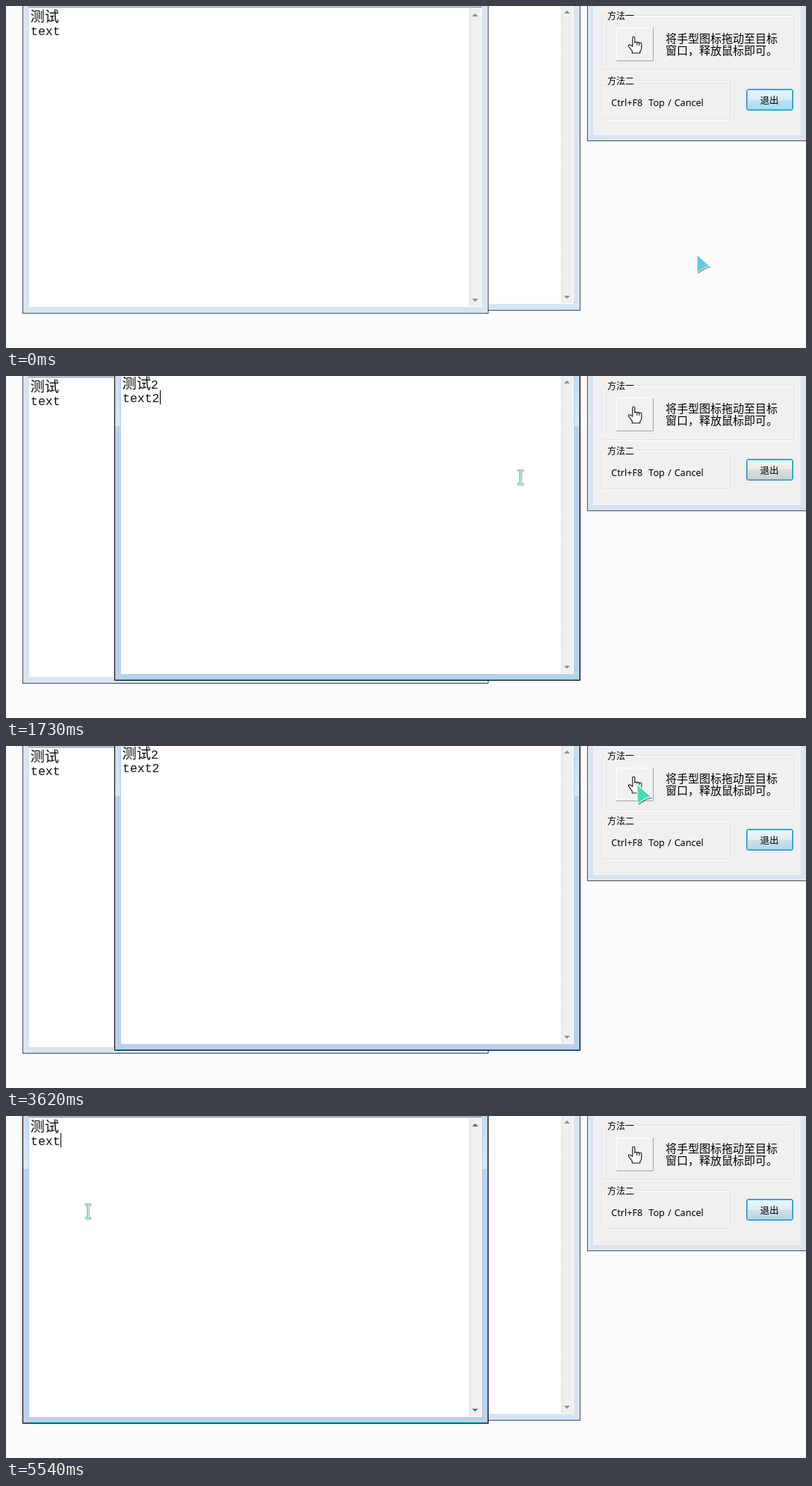
An HTML page for the animation above (5620 ms loop, 1071 by 458 pixels).

```html
<!DOCTYPE html>
<html lang="zh">
<head>
<meta charset="utf-8">
<title>窗口置顶</title>
<style>
html, body { margin: 0; width: 100%; height: 100%; overflow: hidden; background: #fbfbfb; }
svg { display: block; width: 1071px; height: 458px; }
text { font-family: "Noto Sans CJK SC", "Noto Sans CJK", sans-serif; fill: #000; white-space: pre; }
.note { font-family: "Liberation Mono", "Noto Sans CJK SC", "Noto Sans CJK", monospace; font-size: 16.5px; font-weight: 300; fill: #111; }
.note .han { font-size: 19.3px; }
.latin { font-family: "Noto Sans", sans-serif; font-size: 12.6px; word-spacing: .8px; }
.edge { fill: #d7e4f2; stroke: #4a5058; }
.lit { display: none; }
.tri { fill: #8b8b8b; }
.on .edge { fill: #b9d1ea; stroke: #000; }
.on .lit { display: inline; }
.front.on .tri { fill: #4d6f8f; }
.box { fill: none; stroke: #dcdfe0; }
.boxlight { fill: none; stroke: #fff; }
</style>
</head>
<body>
<svg viewBox="0 0 1071 458">
  <defs>
    <linearGradient id="glint" x2="0" y2="1">
      <stop offset="0" stop-color="#c0d7ee"/><stop offset="1" stop-color="#d8e7f7"/>
    </linearGradient>
    <linearGradient id="track">
      <stop offset="0" stop-color="#e6e6e6"/><stop offset=".25" stop-color="#f0f0f0"/>
    </linearGradient>
    <linearGradient id="grey" x2="0" y2="1">
      <stop offset="0" stop-color="#f3f3f3"/><stop offset=".5" stop-color="#ebebeb"/>
      <stop offset=".5" stop-color="#ddd"/><stop offset="1" stop-color="#cfcfcf"/>
    </linearGradient>
    <linearGradient id="blue" x2="0" y2="1">
      <stop offset="0" stop-color="#eaf6fd"/><stop offset=".5" stop-color="#d5eefb"/>
      <stop offset=".5" stop-color="#bee6fa"/><stop offset="1" stop-color="#a9daf3"/>
    </linearGradient>
    <path id="hand" d="M-2 13V1.5Q-2 0-.5 0T1 1.5V8q1.5-1.5 3 0q2-1 3 .6q2.5-1 3 1V15q0 3-2 5v2H-2.5v-2.5l-5-7q0-2.5 2-1.5z"/>
    <path id="arrow" d="M0 0L17 15.5L10 17.5L0 24Z"/>
    <path id="beam" d="M-4-9h3l1 1 1-1h3M0-8V8M-4 9h3l1-1 1 1h3"/>
  </defs>
  <g id="desk"></g>
  <g id="dialog"></g>
  <g id="pointer">
    <g id="p-arrow"><use href="#arrow" x="1.5" y="1.5" opacity=".45"/>
      <use href="#arrow" stroke="#fff" id="tint"/></g>
    <g id="p-hand" transform="scale(1.1 1)"><use href="#hand" x="2" y="1.5" opacity=".4"/>
      <use href="#hand" x="1" fill="#35dfb2" stroke="#fff" stroke-width="1.2"/></g>
    <g id="p-beam" fill="none"><use href="#beam" x="1" y="1" stroke="#666" stroke-width="3.6" opacity=".6"/>
      <use href="#beam" stroke="#fff" stroke-width="3.4"/>
      <use href="#beam" stroke="#5fd3b4" stroke-width="1.6"/></g>
    <circle id="press" r="12" fill="#fff32e" opacity=".62"/>
  </g>
</svg>
<script>
const $ = id => document.getElementById(id);
const LOOP = 5620, TICK = 79.3, FIRST = 48;

const rect = (x, y, w, h, extra) => `<rect x="${x}" y="${y}" width="${w}" height="${h}" ${extra}/>`;

function frame(left, right, bottom, shine) {
  return rect(left + .5, -20.5, right - left, bottom + 21, 'class="edge"') +
    `<g class="lit">` +
    rect(left + 1, -20, 7, shine + 20, 'fill="url(#glint)"') +
    rect(right - 7, -20, 6, shine + 20, 'fill="url(#glint)"') +
    `<path d="M${left + 1} ${bottom - .5}H${right - .5}V-20" fill="none" stroke="#36c9f0"/></g>`;
}

function notepad(id, dx, dy, suffix) {
  const caret = 73.5 + 10 * suffix.length;
  return `<g id="${id}" transform="translate(${dx} ${dy})">` +
    frame(22, 645, 411, 71) +
    rect(31, 1, 606, 402, 'fill="#fff"') +
    rect(30, 1, 607, 1, 'fill="#7d858f"') +
    rect(620, 2, 16, 400, 'fill="url(#track)"') +
    `<path class="tri" d="M624 14l4-4 4 4zM624 392l4 4 4-4z"/>
    <text class="note" x="32.5" y="20.5"><tspan class="han">测试</tspan>${suffix}</text>
    <text class="note" x="33" y="39">text${suffix}</text>
    <path class="caret" d="M${caret} 23V42" stroke="#000"/></g>`;
}

function groupBox(x, y, w, h, title) {
  return rect(x + 1.5, y + 1.5, w, h, 'rx="3" class="boxlight"') +
    rect(x + .5, y + .5, w, h, 'rx="3" class="box"') +
    rect(804, y - 4, 38, 10, 'fill="#f0f0f0"') +
    `<text x="805" y="${y + 5.5}" font-size="12">${title}</text>`;
}

$('desk').innerHTML = notepad('second', 123, -4, '2') + notepad('first', 0, 0, '');

$('dialog').innerHTML =
  frame(778, 1071, 180, 87) +
  rect(786, -5, 278, 178, 'fill="#f0f0f0"') +
  groupBox(798, 12, 257, 73, '方法一') +
  groupBox(797, 99, 173, 52, '方法二') +
  rect(817, 29, 50, 45, 'fill="#f1f1f1"') +
  `<path d="M817.5 73V29.5H866" fill="none" stroke="#fff"/>
  <path d="M817 73.5H866.5V29" fill="none" stroke="#a3a3a3"/>
  <use href="#hand" x="840.8" y="41" fill="#fff" stroke="#111" stroke-width="1.1"/>
  <path d="M844.8 49v4M847.8 50v3" stroke="#111"/>
  <text x="883" y="48.5" font-size="15">将手型图标拖动至目标</text>
  <text x="883" y="64.5" font-size="15">窗口，释放鼠标即可。</text>
  <text class="latin" x="810.3" y="134">Ctrl+F8  Top / Cancel</text>` +
  rect(991.5, 111.5, 62, 28, 'rx="2.5" fill="url(#grey)" stroke="#2a86ab"') +
  rect(993, 113, 59, 25, 'fill="url(#blue)" id="glow"') +
  rect(992.5, 112.5, 60, 26, 'rx="1.5" fill="none" stroke="#46d0f4"') +
  `<text x="1022" y="130.5" font-size="12.5" text-anchor="middle">退出</text>`;

// Times count screen refreshes: the scene opens at `at`, the pointer travels from `go` to `end`
const HOME = [925, 333], ICON = [845, 51];
const scenes = [
  { at: 0, go: 0, end: 8, to: ICON },
  { at: 10, go: 11, end: 19, to: [688, 135], focus: 'dialog', held: true },
  { at: 22, go: 23, end: 30, to: [101, 115], focus: 'second' },
  { at: 30, go: 33, end: 37, to: [290, 126], focus: 'first', click: true },
  { at: 37, go: 40, end: 45, to: ICON, focus: 'second', click: true },
  { at: 47, go: 48, end: 53, to: [491, 146], focus: 'dialog', held: true },
  { at: 55, go: 55, end: 63, to: [109, 127], focus: 'second' },
  { at: 63, go: 63, end: 64, to: [109, 127], focus: 'first', click: true }
];
const RAISED = scenes[2].at, LOWERED = scenes[7].at;

function ease(u) {
  u = Math.min(1, Math.max(0, u));
  return u * u * (3 - 2 * u);
}

// Default button: lit at rest, dark while dragging, then breathing
function glow(n) {
  if (n < RAISED) return n < scenes[1].at ? 1 : 0;
  return .75 * Math.sin((n - RAISED) / 37 * Math.PI) ** 2;
}

const show = (el, on) => el.setAttribute('visibility', on ? 'visible' : 'hidden');

function draw(now) {
  const n = Math.max(0, Math.floor((now % LOOP - FIRST) / TICK) + 1);
  const i = scenes.filter(s => s.at <= n).length - 1;
  const { at, go, end, to, focus, held, click } = scenes[i];
  const from = i ? scenes[i - 1].to : HOME;
  const u = ease((n - go) / (end - go));
  const [x, y] = from.map((v, k) => v + (to[k] - v) * u);
  const shape = held ? 'hand' : x > 778 ? 'arrow' : 'beam';
  const front = $(n >= RAISED && n < LOWERED ? 'second' : 'first');

  if ($('desk').lastElementChild !== front) $('desk').append(front);
  for (const id of ['first', 'second', 'dialog']) {
    const win = $(id), on = id === focus;
    win.classList.toggle('on', on);
    win.classList.toggle('front', id === 'first' && win === front);
    const caret = win.querySelector('.caret');
    if (caret) show(caret, on && (n - at) % 16 < 8);
  }

  $('glow').setAttribute('opacity', glow(n));
  $('pointer').setAttribute('transform', `translate(${x.toFixed(1)} ${y.toFixed(1)})`);
  for (const s of ['arrow', 'hand', 'beam']) show($('p-' + s), s === shape);
  $('tint').setAttribute('fill', i ? '#45dcb0' : '#5fcbd9');
  $('p-arrow').setAttribute('transform', `scale(${i ? 1.1 : 1})`);
  show($('press'), held || click && n === at);
}

const start = performance.now();
function tick() {
  draw(performance.now() - start);
  requestAnimationFrame(tick);
}
tick();
</script>
</body>
</html>
```
